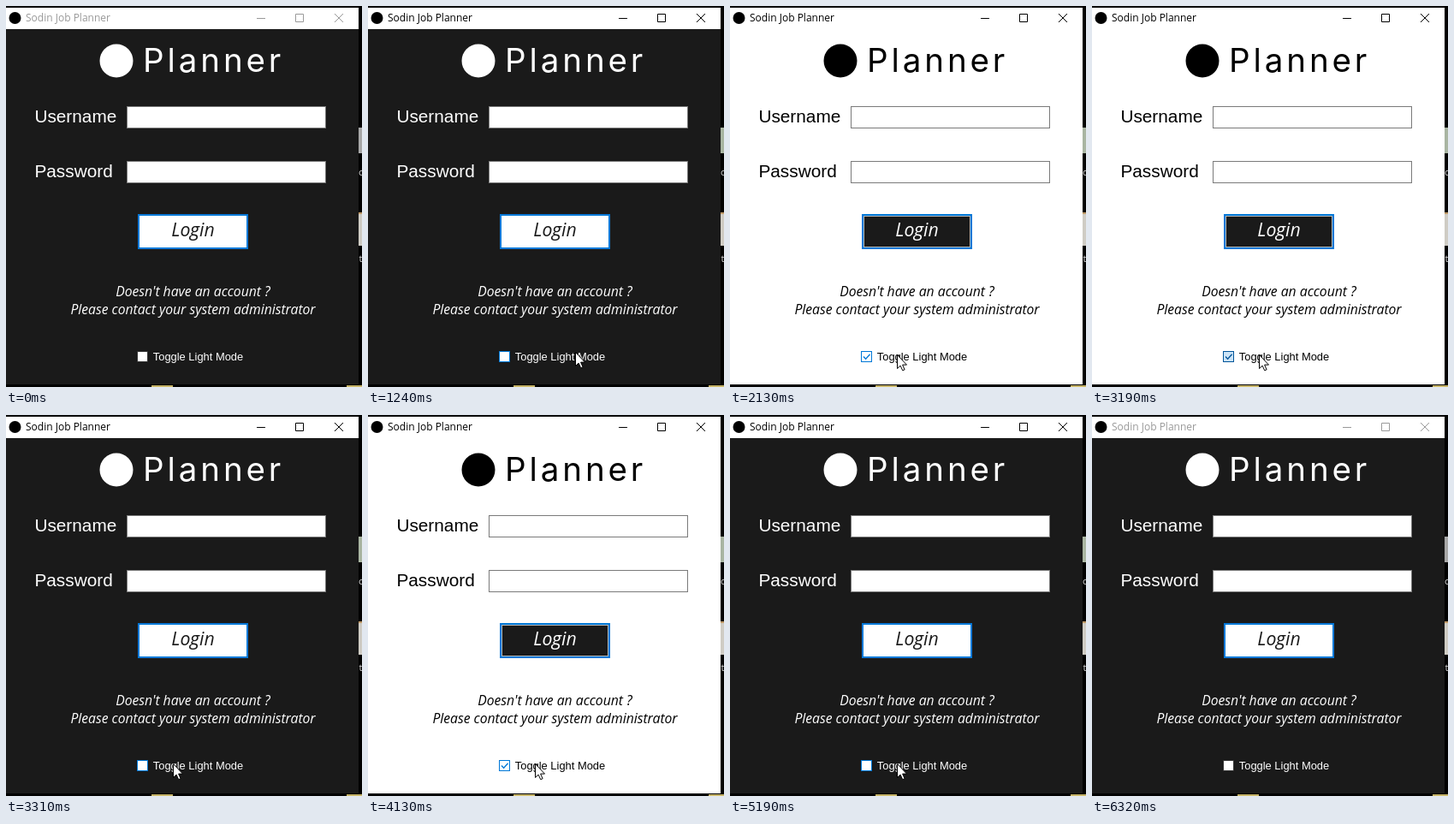
Write an HTML page that moves like this. It is 416 by 445 pixels and loops after 6.39 s.

```html
<!DOCTYPE html>
<html lang="en">
<head>
<meta charset="utf-8">
<title>Login</title>
<style>
html, body { margin: 0; width: 100%; height: 100%; overflow: hidden; background: #000; }
svg { display: block; width: 416px; height: 445px; --bg: #1a1a1a; --fg: #fff; --btn: #fff; --btnText: #1a1a1a; --ring: #fff; --title: #999; --art: #a8a8a8; }
.light { --bg: #fff; --fg: #000; --btn: #1a1a1a; --btnText: #fff; --ring: #b8b8b8; }
.active { --title: #000; --art: #a9b5a2; }
text { fill: var(--fg); }
.ui { font-family: "Open Sans", "Noto Sans", sans-serif; }
.label { font-family: "Liberation Sans", Arial, sans-serif; font-size: 20.8px; }
.note { font-size: 15.75px; font-style: italic; text-anchor: middle; }
.desk { font-size: 11px; fill: #ddd; }
.field { fill: #fff; stroke: #7a7a7a; }
.glyphs { fill: none; stroke: var(--title); }
#box { fill: #fff; stroke: #333; }
#tick { fill: none; stroke: #0078d7; stroke-width: 1.3; visibility: hidden; }
.light #tick { visibility: visible; }
.hover #box { stroke: #0078d7; }
.press #box { stroke: #005499; fill: #cce4f7; }
.press #tick { stroke: #005499; }
</style>
</head>
<body>
<svg id="stage" viewBox="0 0 416 445">
  <!-- desktop behind the window -->
  <rect width="416" height="445"/>
  <rect x="412" y="142" width="4" height="30" fill="var(--art)"/>
  <rect x="412" y="241" width="4" height="39" fill="#cfccc4"/>
  <rect x="412" y="241" width="4" height="2" fill="#c09a68"/>
  <text class="ui desk" x="412" y="198" style="fill:#ddd">c</text>
  <text class="ui desk" x="412.5" y="299" style="fill:#ddd">t</text>
  <path d="M170 443h25v2h-25zM398 443h18v2h-18z" fill="#c8b568"/>

  <!-- window -->
  <rect y="27" width="412" height="415" fill="var(--bg)"/>
  <rect y="2" width="412" height="25" fill="#fff"/>
  <circle cx="10.5" cy="14" r="7"/>
  <text class="ui" x="23" y="18" font-size="12" style="fill:var(--title)">Sodin Job Planner</text>
  <path class="glyphs" d="M293 14.5h10M338.5 9.5h9v9h-9zM384 9l10 10m0-10l-10 10"/>

  <circle cx="129" cy="64" r="19.5" fill="var(--fg)"/>
  <text x="160" y="76.5" font-size="38.5" letter-spacing="3.9" font-family="Inter, 'Open Sans', sans-serif">Planner</text>

  <text class="label" x="33.4" y="136">Username</text>
  <text class="label" x="33.4" y="200">Password</text>
  <rect class="field" x="141.5" y="117.5" width="232" height="25"/>
  <rect class="field" x="141.5" y="181.5" width="232" height="25"/>

  <rect x="155" y="244" width="127" height="39" fill="var(--ring)" stroke="#0078d7" stroke-width="2"/>
  <rect x="157" y="246" width="123" height="35" fill="var(--btn)"/>
  <text class="ui note" x="218.5" y="269" style="font-size:21.3px; fill:var(--btnText)">Login</text>

  <text class="ui note" x="218.5" y="339">Doesn't have an account ?</text>
  <text class="ui note" x="218.5" y="360">Please contact your system administrator</text>

  <rect id="box" x="153.5" y="403.5" width="12" height="12"/>
  <path id="tick" d="M156 409.5l2.6 2.8 5-5.6"/>
  <text class="label" x="171.8" y="414" style="font-size:12.9px">Toggle Light Mode</text>

  <path id="cursor" d="M.5 .5V16.5l3.6-3.4 2.6 5.6 2.4-1-2.5-5.6h4.9z" fill="#fff" stroke="#000"/>
</svg>
<script>
const LOOP = 6390, HOLD = 70;
const stage = document.getElementById("stage");
const cursor = document.getElementById("cursor");
const presses = [2000, 3190, 4060, 5070];

const lerp = (a, b, p) => a + (b - a) * p;
const easeOut = (p, power) => 1 - (1 - p) ** power;
const progress = (t, start, end) => Math.min(1, Math.max(0, (t - start) / (end - start)));

// Rise from the lower right, sweep to the checkbox, then leave
function pointer(t) {
  if (t < 1050) {
    const p = progress(t, 430, 550);
    return [lerp(387, 379, p), lerp(426, 362, p)];
  }
  if (t >= 5820) return [249, 424];
  const p = progress(t, 1050, 1570);
  return [lerp(379, 195, easeOut(p, 3)), lerp(362, 407, easeOut(p, 6))];
}

function draw(now) {
  const t = now % LOOP;
  const within = (start, end) => t >= start && t < end;
  const set = (name, on) => stage.classList.toggle(name, on);

  cursor.style.visibility = within(430, 5890) ? "visible" : "hidden";
  cursor.setAttribute("transform", `translate(${pointer(t).map(Math.round)})`);

  set("active", within(740, 6320));
  set("hover", within(1240, 5820));
  set("press", presses.some(down => within(down, down + HOLD)));
  set("light", presses.filter(down => t >= down + HOLD).length % 2 === 1);
  requestAnimationFrame(draw);
}
draw(0);
</script>
</body>
</html>
```
